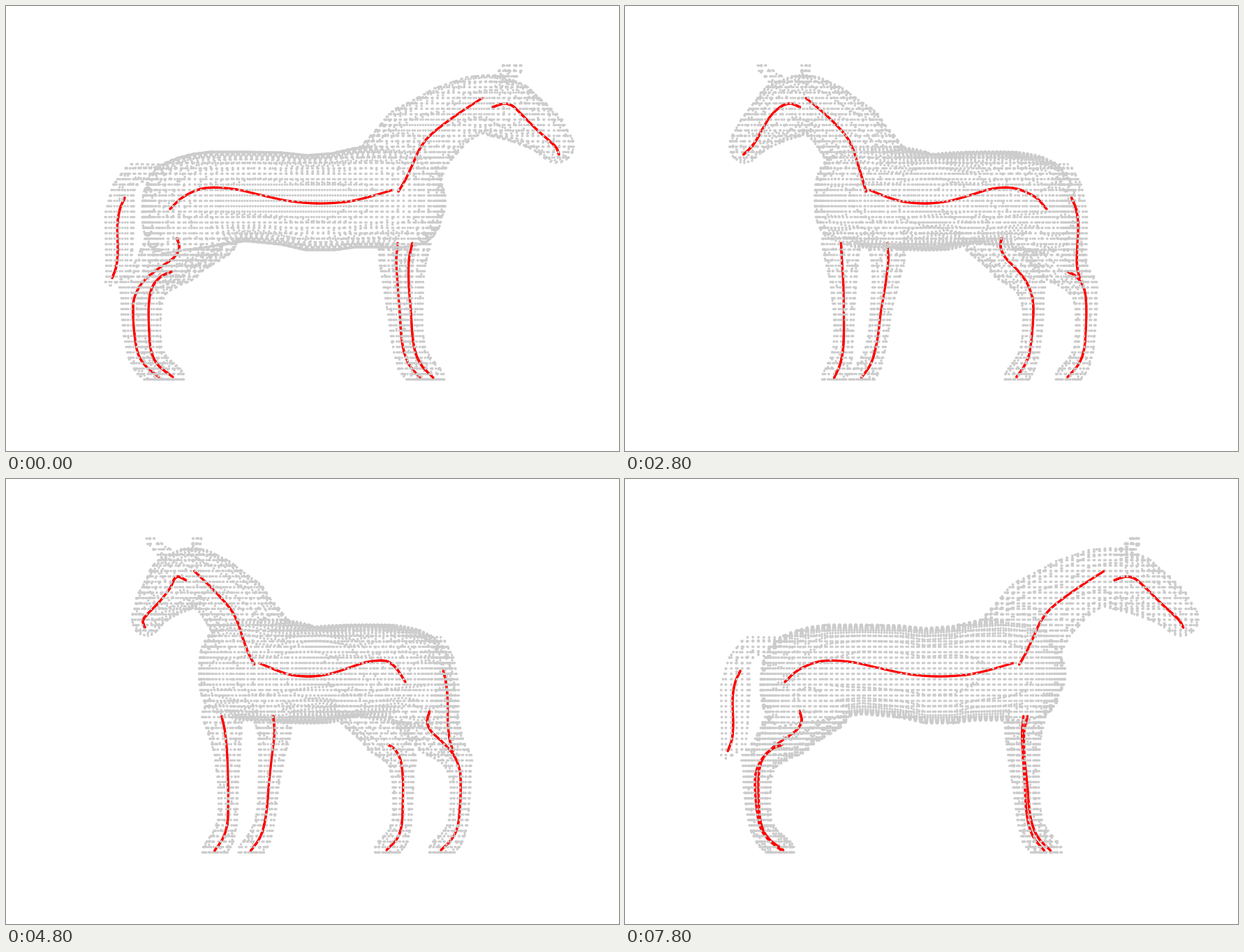
A matplotlib script for the animation above (8000 ms loop, 878x638 px).

```python
import numpy as np
import matplotlib.pyplot as plt
from matplotlib.animation import FuncAnimation

WIDTH, HEIGHT, DPI = 878, 638, 64
FRAMES, INTERVAL = 40, 200
CX, TOP, GROUND = 439.2, 85.3, 535.4
CELL = 7.76
YAW = np.radians(10.8)      # heading of the body at the start
GRAY, RED = (0.8, 0.8, 0.8, 1), (1, 0, 0, 1)

# Bones as (x in side view, x in front view, y)
TAIL = [(170, 387, 275), (163, 384, 292), (159.5, 383, 315),
        (160, 384.5, 350), (158, 386, 373), (152, 386, 390)]
SPINE = [(235, 384, 291), (252, 390, 275), (275, 402, 263.5), (298, 411, 260.3),
         (330, 417, 263), (365, 424, 271), (405, 433, 279.5), (445, 443, 283),
         (485, 452, 281), (515, 459, 275), (553, 466, 264)]
NECK = [(562, 466, 266), (572, 465, 249), (582, 465.5, 228), (592, 467, 206),
        (605, 469, 188), (625, 472.5, 171), (650, 477.5, 153), (682, 485, 132)]
HEAD = [(697, 485, 145), (712, 489, 140.3), (725, 496, 143), (740, 505, 157),
        (760, 506, 177), (778, 504, 193), (788, 506, 203), (792, 516, 213)]
FORE_FAR = [(561, 511, 340), (559, 511, 365), (561, 507, 400), (564, 504, 440),
            (566, 502.5, 470), (570, 501.5, 495), (578, 501, 515), (593, 500, 533)]
FORE_NEAR = [(582, 414, 340), (577, 416, 365), (577, 421, 400), (580, 427, 440),
             (582, 430, 470), (586, 433, 495), (595, 435, 515), (612, 438, 533)]
HIND_FAR = [(245, 457, 333), (248, 455.5, 347), (240, 453, 361), (215, 450, 379),
            (195, 448, 397), (184, 446.5, 418), (182, 446, 440), (184, 447, 470),
            (189, 448, 498), (200, 449, 516), (219, 449, 532)]
HIND_NEAR = [(237, 345, 381), (222, 341, 388), (209, 337, 404), (204.5, 336, 430),
             (205, 336.5, 465), (208, 338, 495), (218, 341, 515), (239, 344, 532)]
LEGS = [FORE_FAR, FORE_NEAR, HIND_FAR, HIND_NEAR]

# Torso sections as (x, top, bottom, half width)
TORSO = np.array([
    (197, 265, 325, 35), (205, 242, 345, 52), (220, 228, 355, 66),
    (240, 219, 352, 78), (265, 212, 348, 86), (290, 209, 345, 90),
    (340, 209, 337, 92), (395, 210, 342, 92), (430, 214, 350, 92),
    (470, 211, 350, 92), (500, 204, 346, 90), (540, 200, 346, 88),
    (575, 202, 346, 84), (600, 212, 340, 72), (615, 230, 328, 58),
    (626, 262, 300, 30)], float)

# Tubes as (x, y, radius, lateral centre, lateral half width)
NECK_TUBE = [(540, 265, 68, 0, 70), (570, 225, 60, 0, 50), (590, 195, 56, 0, 34),
             (635, 160, 46, 0, 28), (672, 142, 41, 0, 30), (695, 140, 41, 0, 31)]
HEAD_TUBE = [(703, 143, 43, 0, 32), (728, 150, 42, -2, 41), (755, 165, 36, -4, 27),
             (778, 180, 31, -6, 21), (797, 200, 25, -10, 18)]
TAIL_TUBE = [(212, 240, 13, 0, 16), (178, 239, 13, 0, 14), (162, 264, 16, 0, 12),
             (158, 300, 22, 0, 11), (157, 350, 20, 0, 10), (156, 375, 19, 0, 9),
             (144, 394, 8, 0, 8)]
THIGH_TUBE = [(262, 320, 60, 50, 42), (235, 360, 38, 50, 33),
              (203, 392, 24, 53, 17), (189, 403, 21, 55, 14)]
EAR_TUBE = [(718, 106, 10, 28, 9), (730, 89, 7, 46, 7)]


def to_body(bone):
    """Turn two-view points into body axes: along, down, across."""
    side, front, y = np.array(bone, float).T
    a, b = side - CX, CX - front
    c, s = np.cos(YAW), np.sin(YAW)
    return np.stack([a * c - b * s, y, a * s + b * c], axis=1)


def smooth(p, n=24):
    """Hermite curve through the points."""
    m = np.gradient(p, axis=0)
    t = np.linspace(0, 1, n)[:, None]
    h = t * t * (3 - 2 * t)
    pieces = [(1 - h) * p[i] + h * p[i + 1]
              + t * (1 - t) ** 2 * m[i] - t * t * (1 - t) * m[i + 1]
              for i in range(len(p) - 1)]
    return np.concatenate(pieces)


us = np.arange(-46, 54) * CELL
ys = GROUND - np.arange(-1, 62) * CELL
ws = (np.arange(-15, 15) + 0.5) * CELL
U, Y = np.meshgrid(us, ys, indexing="ij")


def tube(stations):
    """Field of a tapered tube, positive inside."""
    best = np.full(U.shape + ws.shape, -9.0)
    for a, b in zip(stations[:-1], stations[1:]):
        du, dy = b[0] - a[0], b[1] - a[1]
        t = ((U - a[0]) * du + (Y - a[1]) * dy) / (du * du + dy * dy)
        t = np.clip(t, 0, 1)
        d = np.hypot(U - a[0] - t * du, Y - a[1] - t * dy)
        r, mid, half = (a[k] + t * (b[k] - a[k]) for k in (2, 3, 4))
        across = (ws - mid[..., None]) / half[..., None]
        best = np.maximum(best, 1 - np.hypot((d / r)[..., None], across))
    return best


def shaped(rows, side=1):
    p = np.array(rows, float)
    p[:, 0] -= CX
    p[:, 3] *= side
    return tube(p)


def leg(bone):
    u, y, w = to_body(bone).T
    knots = [340, 370, 400, 440, 480, 500, 515, 533]
    r = np.interp(y, knots, [26, 24, 21, 17, 15, 15, 17, 16])
    half = np.interp(y, knots, [30, 21, 14, 12, 12, 13, 15, 19])
    return tube(np.stack([u, y, r, w, half], axis=1))


def torso(p=2.8):
    x = us + CX
    top, bottom, half = (np.interp(x, TORSO[:, 0], TORSO[:, k])[:, None]
                         for k in (1, 2, 3))
    down = np.abs(2 * Y - top - bottom) / (bottom - top)
    across = np.abs(ws) / half
    f = 1 - (down[..., None] ** p + across[:, None, :] ** p) ** (1 / p)
    f[(x < TORSO[0, 0]) | (x > TORSO[-1, 0])] = -1
    return f


def surface(f):
    """Points where grid edges cross the zero level."""
    axes = np.meshgrid(us, ys, ws, indexing="ij")
    found = []
    for k in range(3):
        n = f.shape[k]
        lo, hi = np.arange(n - 1), np.arange(1, n)
        a, b = f.take(lo, k), f.take(hi, k)
        hit = (a > 0) != (b > 0)
        t = a[hit] / (a[hit] - b[hit])
        found.append(np.stack([(1 - t) * g.take(lo, k)[hit] + t * g.take(hi, k)[hit]
                               for g in axes], axis=1))
    p = np.concatenate(found)
    p[:, 1] = np.clip(p[:, 1], TOP, GROUND)
    return p


parts = [torso(), shaped(NECK_TUBE), shaped(HEAD_TUBE), shaped(TAIL_TUBE)]
parts += [shaped(t, s) for t in (THIGH_TUBE, EAR_TUBE) for s in (-1, 1)]
parts += [leg(b) for b in LEGS]
field = np.maximum.reduce(parts)
field[:, 0] = -1            # flat soles

skin = surface(field)
bones = np.concatenate([smooth(to_body(b)) for b in [TAIL, SPINE, NECK, HEAD] + LEGS])
points = np.concatenate([skin, bones])
colors = np.array([GRAY] * len(skin) + [RED] * len(bones))

fig = plt.figure(figsize=(WIDTH / DPI, HEIGHT / DPI), dpi=DPI, facecolor="white")
ax = fig.add_axes([0, 0, 1, 1])
ax.set_xlim(0, WIDTH)
ax.set_ylim(HEIGHT, 0)
ax.axis("off")
dots = ax.scatter(points[:, 0], points[:, 1], s=(3.4 * 72 / DPI) ** 2,
                  c=colors, linewidths=0)


def update(i):
    angle = YAW + 2 * np.pi * i / FRAMES
    c, s = np.cos(angle), np.sin(angle)
    u, y, w = points.T
    order = np.argsort(w * c - u * s, kind="stable")
    dots.set_offsets(np.stack([CX + u * c + w * s, y], axis=1)[order])
    dots.set_facecolors(colors[order])
    return [dots]


anim = FuncAnimation(fig, update, frames=FRAMES, interval=INTERVAL,
                     repeat=True, repeat_delay=0, blit=False)
plt.show()
```
